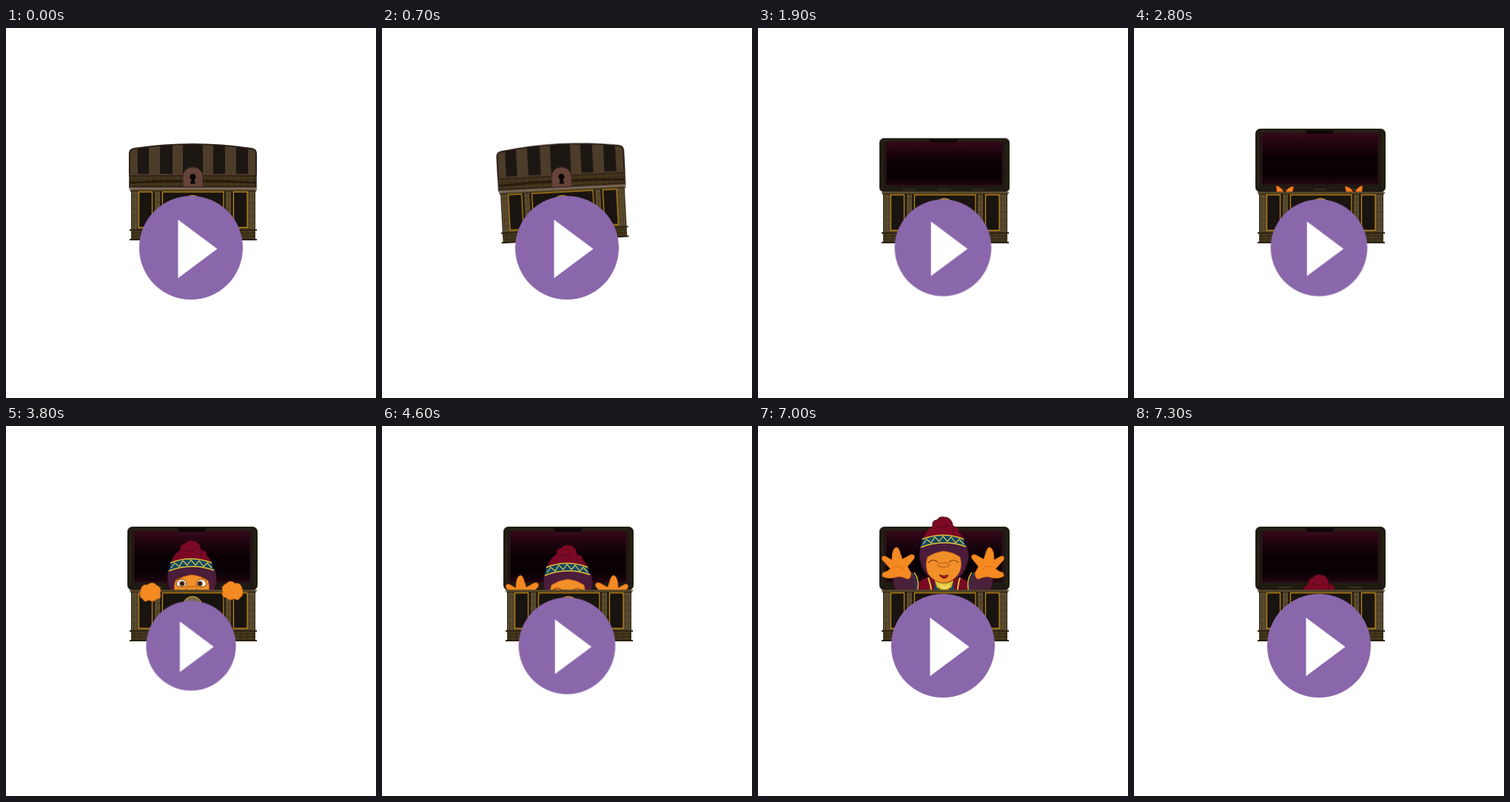
Animation, 500 px wide and 500 px high, one loop 7400 ms. Source, as an HTML page without scripts:

```html
<!DOCTYPE html>
<html lang="en">
<head>
<meta charset="utf-8">
<title>Treasure chest</title>
<style>
html, body { margin: 0; width: 100%; height: 100%; overflow: hidden; background: #fff; }
svg { display: block; width: 100%; height: 100%; }
.anim { animation: 7400ms steps(1) infinite; }

#button { animation-name: pulse; animation-timing-function: steps(3); transform-origin: 250px 297px; }
@keyframes pulse {
  0%, 24.32%, 32.43%, 36.48%, 44.59%, 48.64%, 56.75%, 60.81%, 68.91%, 100% { transform: scale(1); }
  28.37%, 40.54%, 52.7%, 64.86% { transform: scale(.8); }
}

#closed { animation-name: shake; transform-origin: 252px 221px; }
@keyframes shake {
  0%, 16.21% { transform: none; }
  6.75%, 17.56% { transform: translateX(-5px) rotate(-1deg); }
  8.1%, 18.91% { transform: translateX(8px) rotate(2deg); }
  9.45%, 20.27% { transform: translateX(-9px) rotate(-3deg); }
  10.81%, 21.62% { transform: translateX(12px) rotate(3deg); }
  12.16%, 22.97% { transform: translateX(-8px) rotate(-2deg); }
  13.51% { transform: translateX(6px) rotate(2deg); }
  14.86% { transform: translateX(-3px) rotate(-1deg); }
  24.32%, 100% { transform: none; visibility: hidden; }
}

#open { animation-name: appear; }
@keyframes appear { 0% { visibility: hidden; } 24.32%, 100% { visibility: visible; } }

#cover { animation-name: unfold; transform-origin: 252px 221px; }
@keyframes unfold {
  0% { transform: scaleY(.45); }
  25.67% { transform: scaleY(.85); }
  27.02% { transform: scaleY(1.12); }
  28.37%, 100% { transform: none; }
}

#tips { animation-name: reach; }
@keyframes reach {
  0%, 39.18%, 100% { transform: translateY(20px); }
  33.78% { transform: translateY(7px); }
  35.13% { transform: translateY(4px); }
  36.48% { transform: translateY(2px); }
  37.83% { transform: none; }
}

#grip { animation-name: hold; }
@keyframes hold {
  0%, 60.81%, 100% { visibility: hidden; }
  39.18% { visibility: visible; transform: translateY(-8px); }
  40.54% { visibility: visible; transform: none; }
}

#figure { animation-name: rise; }
@keyframes rise {
  0% { transform: translateY(130px); }
  41.89% { transform: translateY(118px); animation-timing-function: steps(5); }
  48.64% { transform: translateY(58px); }
  54.05% { transform: translateY(60px); }
  56.75% { transform: translateY(58px); }
  59.45% { transform: translateY(61px); }
  60.81% { transform: translateY(70px); }
  62.16% { transform: translateY(64px); animation-timing-function: steps(5); }
  68.91% { transform: translateY(4px); }
  70.27% { transform: translateY(-3px); }
  71.62% { transform: translateY(-2px); }
  72.97% { transform: translateY(-1px); }
  74.32% { transform: none; }
  93.24% { transform: none; animation-timing-function: steps(4); }
  98.64%, 100% { transform: translateY(104px); }
}

#arms, #happy { animation-name: wave; }
@keyframes wave { 0% { visibility: hidden; } 60.81%, 100% { visibility: visible; } }
#awake { animation-name: look; }
@keyframes look { 0% { visibility: visible; } 60.81%, 100% { visibility: hidden; } }
</style>
</head>
<body>
<svg viewBox="0 0 500 500">
  <defs>
    <linearGradient id="lining" x2="0" y2="1">
      <stop offset="0" stop-color="#36091a"/>
      <stop offset=".25" stop-color="#1d040e"/>
      <stop offset=".5" stop-color="#0a0104"/>
      <stop offset=".8" stop-color="#080103"/>
      <stop offset="1" stop-color="#1f0510"/>
    </linearGradient>
    <pattern id="plank" width="9" height="4" patternUnits="userSpaceOnUse">
      <path fill="#40331b" d="M0 0h9v4H0z"/>
      <path stroke="#30260f" d="M0 1h7"/>
      <path stroke="#4d4026" d="M3 3h6"/>
    </pattern>
    <pattern id="post" width="4" height="9" patternUnits="userSpaceOnUse">
      <path fill="#56482b" d="M0 0h4v9H0z"/>
      <path stroke="#44381f" d="M1 0v7"/>
      <path stroke="#655636" d="M3 3v6"/>
    </pattern>
    <clipPath id="inside"><path d="M0 0H500V222H0z"/></clipPath>
    <clipPath id="dome"><path id="domeShape" d="M167 199V170Q167 164 173 163Q252 151 332 163Q338 164 338 170V199z"/></clipPath>

    <g id="box">
      <path fill="url(#post)" stroke="#2b2114" d="M169.500 218H336.500V286H169.500z"/>
      <path fill="#231b11" d="M198 221H201V271H198zM208 221H212V271H208zM294 221H297V271H294zM304 221H307V271H304z"/>
      <path fill="url(#plank)" d="M169 272H337V286H169z"/>
      <path stroke="#2e2314" stroke-width="2" d="M167 273H339M167 286H339"/>
      <path stroke="#5b4b2c" stroke-width="2" d="M167 218.500H339"/>
      <path stroke="#2b2114" d="M168 220.500H338"/>
      <path fill="#19140f" stroke="#b9831a" stroke-width="1.300" d="M179.500 221.500H197.500V269.500H179.500zM211.500 221.500H294V269.500H211.500zM307.500 221.500H326V269.500H307.500z"/>
      <circle cx="252" cy="239" r="12.500" fill="#77684b" stroke="#b38b3c" stroke-width="1.500"/>
    </g>

    <g id="arm">
      <path fill="#4a2138" stroke="#2c1022" d="M183 177L209 171Q218 182 217 206L212 209Q200 206 190 200Q181 192 183 177z"/>
      <path fill="none" stroke="#d8bd32" stroke-width="1.500" d="M211 172Q220 183 214 203"/>
      <path fill="none" stroke="#164b69" stroke-width="2" stroke-dasharray="3 2" d="M208 174Q217 184 211 201"/>
      <path fill="#f58a22" stroke="#c9641a" stroke-width=".8" d="M168 155Q166 149 172 150L181 155Q181 144 184 140Q188 135 191 142L195 154L206 148Q213 147 211 153L202 164L207 173Q206 183 200 180Q192 176 184 179Q174 181 168 177Q167 171 173 171L179 167z"/>
      <path fill="none" stroke="#d66b18" d="M181 166Q190 160 197 168"/>
    </g>

    <path id="tip" fill="#f57c20" stroke="#8d3410" stroke-width=".8" d="M192 213Q199 214 203 223H193zM204 223Q208 214 216 214L214 223z"/>
    <path id="fist" fill="#f58a22" stroke="#cf6918" d="M182 222Q184 213 191 215Q198 209 203 215Q211 218 208 226Q211 233 203 234Q199 239 193 235Q187 239 185 234Q179 231 182 222z"/>
  </defs>

  <g id="closed" class="anim">
    <use href="#box"/>
    <g clip-path="url(#dome)">
      <path fill="#4b3d29" d="M160 150H345V200H160z"/>
      <path fill="#1c1712" d="M178 150h15v50h-15zM208 150h17v50h-17zM239 150h27v50h-27zM280 150h16v50h-16zM311 150h16v50h-16z"/>
    </g>
    <use href="#domeShape" fill="none" stroke="#2c1d16" stroke-width="2"/>
    <path fill="url(#plank)" stroke="#291d10" stroke-width="1.500" d="M167 199H338V215H167z"/>
    <path stroke="#251a0c" stroke-width="3" d="M168 209Q250 204 337 209" fill="none"/>
    <path stroke="#5a3c31" stroke-width="1.500" d="M166 198H339M166 216H339"/>
    <path fill="#654339" stroke="#3d2721" d="M239 215V201A13.500 13 0 0 1 266 201V215z"/>
    <path fill="#0c0807" d="M252.500 197a4 4 0 0 1 2 7.500l1.500 6h-7l1.500-6a4 4 0 0 1 2-7.500z"/>
  </g>

  <g id="open" class="anim">
    <g id="cover" class="anim">
      <rect x="164.500" y="136.500" width="175" height="85" rx="6" fill="#1f1a12" stroke="#2a2318"/>
      <path fill="none" stroke="#342b1d" d="M168 216V145Q168 140 173 140H331Q336 140 336 145V216"/>
      <path fill="url(#lining)" stroke="#310c1a" d="M173 211V147Q173 142 178 142H325Q330 142 330 147V211z"/>
      <path fill="#0c0906" d="M231 138H271L268 143H234z"/>
      <path stroke="#39301f" stroke-width="2" d="M195 218H212M243 218H260M290 218H307"/>
    </g>

    <g clip-path="url(#inside)">
      <g id="tips" class="anim">
        <use href="#tip"/>
        <use href="#tip" transform="matrix(-1 0 0 1 501 0)"/>
      </g>
      <g id="figure" class="anim">
        <path fill="#760a27" stroke="#3d0718" d="M211 240L213 190Q222 178 236 177H267Q282 180 288 190L292 240z"/>
        <path fill="#174a60" d="M239 184H264L268 240H236z"/>
        <path fill="none" stroke="#dfc033" stroke-width="2" d="M230 179Q237 196 236 240M273 179Q267 196 269 240"/>
        <path fill="none" stroke="#0f3448" stroke-width="1.500" d="M248 198V240M256 198V240"/>
        <g id="arms" class="anim">
          <use href="#arm"/>
          <use href="#arm" transform="matrix(-1 0 0 1 500 0)"/>
        </g>
        <path fill="#4c1c3b" stroke="#2e1024" d="M220 135Q250 118 282 135Q287 150 282 162Q279 176 267 180H236Q225 176 221 162Q216 149 220 135z"/>
        <path fill="#f28f28" stroke="#b85b18" stroke-width=".8" d="M229 151Q240 144 251 143Q263 144 273 151Q277 164 271 174Q263 185 251 186Q238 185 230 174Q225 163 229 151z"/>
        <path fill="#e2c638" stroke="#a5821e" d="M239 183Q251 190 264 183L261 192L252 198L242 192z"/>
        <path fill="none" stroke="#fff0a0" stroke-width="1.500" d="M246 189L252 193L258 189"/>
        <path fill="none" stroke="#ad5515" d="M243 163Q242 159 250 159Q259 158 258 163Q251 167 243 163"/>
        <path fill="#a01722" stroke="#54150e" stroke-width=".8" d="M245 175Q251 178 257 175Q256 180 251 180Q247 179 245 175z"/>
        <g id="happy" class="anim" fill="none" stroke="#8a4512" stroke-width="1.200">
          <path d="M230 159Q236 152 243 158M258 158Q265 152 271 159"/>
        </g>
        <g id="awake" class="anim">
          <path fill="#fff" stroke="#78400f" d="M230 157Q231 149 238 149Q244 150 244 157Q238 162 230 157zM257 157Q257 150 263 149Q270 149 271 157Q264 162 257 157z"/>
          <g fill="#2b160c" stroke="#86531f" stroke-width="1.500">
            <circle cx="238" cy="155" r="3"/><circle cx="262" cy="155" r="3"/>
          </g>
          <path fill="none" stroke="#603010" stroke-width="1.500" d="M230 148L238 146M264 146L271 148"/>
        </g>
        <path fill="#7b0924" stroke="#45051a" stroke-width=".8" d="M222 129Q226 115 236 109Q235 101 242 101Q245 96 251 97Q260 97 263 106Q262 110 269 111Q272 114 271 117Q277 122 279 129Q250 116 222 129z"/>
        <path fill="none" stroke="#4e061b" d="M241 109Q249 114 257 108M263 109Q266 114 262 119"/>
        <path fill="#124867" d="M222 127Q250 116 278 127L281 137Q250 126 220 138z"/>
        <path fill="none" stroke="#e0c433" stroke-width="1.500" d="M222 127Q250 116 278 127M220 138Q250 126 281 137"/>
        <path fill="none" stroke="#d8c84b" stroke-width="1.200" d="M223 134L228 127L234 132L239 124L245 130L250 123L256 130L261 124L267 132L272 127L278 134"/>
      </g>
    </g>

    <use href="#box" y="4"/>
    <g id="grip" class="anim">
      <use href="#fist"/>
      <use href="#fist" transform="matrix(-1 0 0 1 501 -2)"/>
    </g>
  </g>

  <g id="button" class="anim">
    <circle cx="250" cy="297" r="70" fill="#8a67ab"/>
    <path fill="#fff" d="M232.500 259L285.500 298.500L232.500 338z"/>
  </g>
</svg>
</body>
</html>
```
